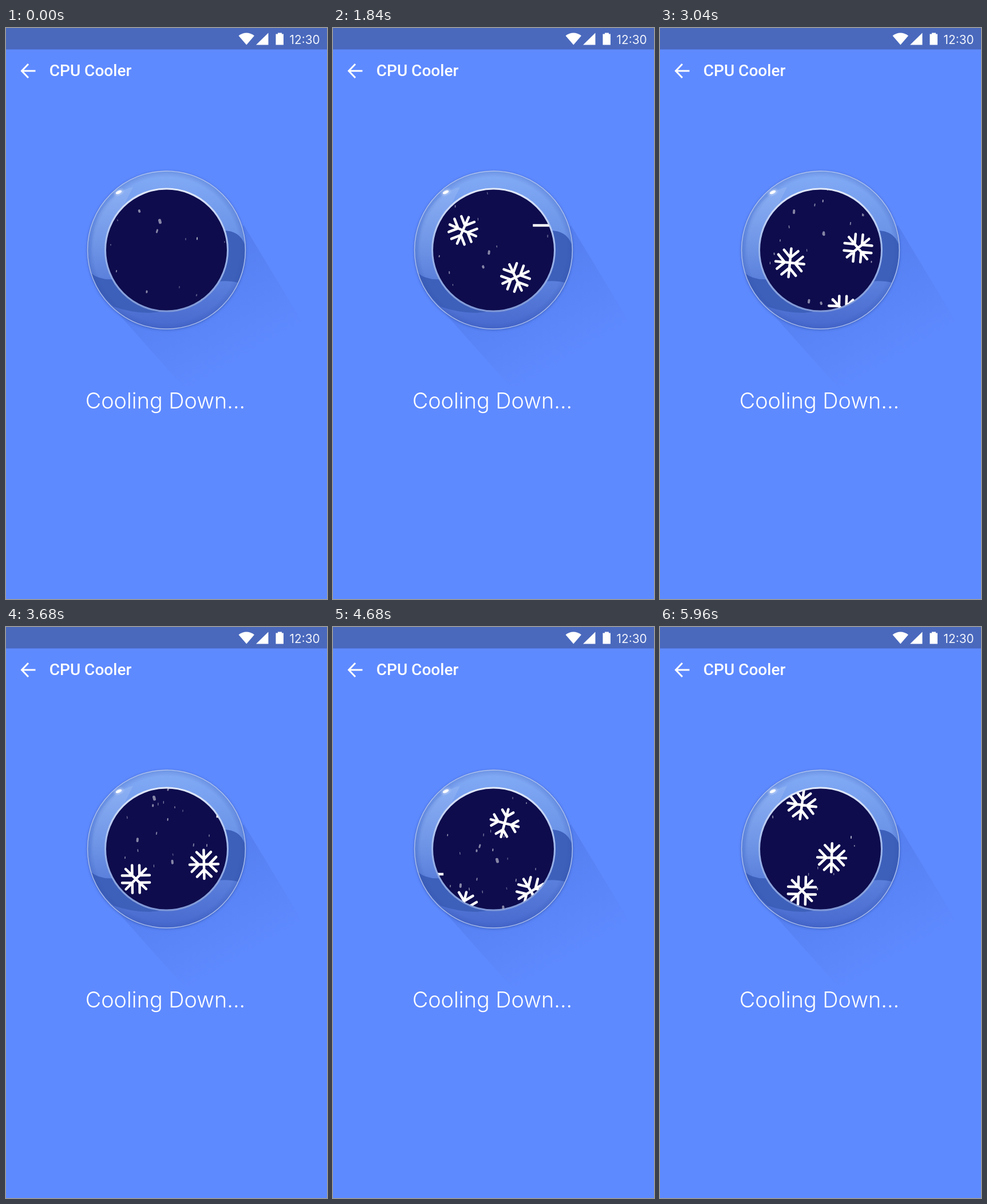
These frames come from a looping animation (561x998 px, 6000 ms). An HTML page with a canvas:

```html
<!DOCTYPE html>
<html lang="en">
<head>
<meta charset="utf-8">
<title>CPU Cooler</title>
<style>
  html, body { margin: 0; width: 100%; height: 100%; overflow: hidden; background: #5e8aff; }
  svg, canvas { position: absolute; left: 0; top: 0; }
</style>
</head>
<body>
<svg width="561" height="998" viewBox="0 0 561 998">
  <defs>
    <linearGradient id="body" x1="0" y1="0" x2="0" y2="1">
      <stop offset="0" stop-color="#82abf6"/>
      <stop offset=".5" stop-color="#668ee4"/>
      <stop offset="1" stop-color="#4869cf"/>
    </linearGradient>
    <linearGradient id="rim" x1="0" y1="0" x2="0" y2="1">
      <stop offset="0" stop-color="#e2eafb"/>
      <stop offset=".5" stop-color="#9db7ec"/>
      <stop offset="1" stop-color="#7f98d6"/>
    </linearGradient>
    <linearGradient id="cast" gradientUnits="userSpaceOnUse" x1="300" y1="423" x2="397" y2="589">
      <stop offset="0" stop-color="#2d4fae" stop-opacity=".18"/>
      <stop offset="1" stop-color="#2d4fae" stop-opacity="0"/>
    </linearGradient>
    <linearGradient id="sheen" x1="0" y1="0" x2="0" y2="1">
      <stop offset="0" stop-color="#fff" stop-opacity=".12"/>
      <stop offset="1" stop-color="#fff" stop-opacity="0"/>
    </linearGradient>
    <radialGradient id="edge">
      <stop offset=".92" stop-color="#2c4ca8" stop-opacity="0"/>
      <stop offset="1" stop-color="#2c4ca8" stop-opacity=".25"/>
    </radialGradient>
    <filter id="soft" x="-20%" y="-20%" width="140%" height="140%"><feGaussianBlur stdDeviation="2"/></filter>
  </defs>

  <path fill="#5e8aff" d="M0 0H561V998H0Z"/>
  <path fill="#4a69bd" d="M0 0H561V37.5H0Z"/>
  <g fill="#fff">
    <path d="M406.5 13.5Q420.2 3.5 434 13.5L420.3 29.5Z"/>
    <path d="M458.5 8.5V29.5H437Z"/>
    <path d="M475 8.5H482V10.5H485V29.5H471.5V10.5H475Z"/>
    <text x="495.5" y="28" font-family="Inter, Roboto, sans-serif" font-weight="400" font-size="20.8" fill="#f1f4fc">12:30</text>
    <text x="75.7" y="84" font-family="Roboto, sans-serif" font-weight="500" font-size="28">CPU Cooler</text>
    <text x="138.7" y="665" font-family="Inter, Roboto, sans-serif" font-weight="350" font-size="37.8">Cooling Down...</text>
  </g>
  <path d="M51.5 75H28M39 63L27.5 75L39 87" fill="none" stroke="#fff" stroke-width="3"/>

  <path d="M416 345L520 518L317 635L195 498Z" fill="url(#cast)"/>
  <circle cx="280.5" cy="389" r="139" fill="#2b4795" opacity=".5" filter="url(#soft)"/>
  <circle cx="280.5" cy="388" r="138" fill="url(#body)"/>
  <path fill="url(#sheen)" d="M222 278Q187 285 163 325Q146 360 149 428Q163 441 188 439L174 388Q176 350 205 312Z"/>
  <g fill="#3d60bb">
    <path d="M148 428Q163 441 188 439L268 496Q232 502 188 487A137 137 0 0 1 148 428Z"/>
    <path d="M380 354Q408 354 417 378A137 137 0 0 1 405 445Q390 441 370 443Z"/>
  </g>
  <circle cx="280.5" cy="388" r="138" fill="url(#edge)"/>
  <circle cx="280.5" cy="388" r="138" fill="none" stroke="#c3d2f3" stroke-opacity=".8" stroke-width="1.4"/>
  <g transform="rotate(-25 197 287)" fill="#fff">
    <ellipse cx="197" cy="287" rx="8" ry="4" opacity=".5" filter="url(#soft)"/>
    <ellipse cx="197" cy="287" rx="5.5" ry="2.6"/>
  </g>
  <circle cx="280.5" cy="388" r="107" fill="#0e0c4d" stroke="url(#rim)" stroke-width="3"/>
</svg>
<canvas id="view" width="561" height="998"></canvas>

<script>
const LOOP = 6000, STEP = 40, FALL = 0.0472, SPIN = 0.06 * Math.PI / 180, SWEEP = 0.165, ARM = 27;
const SKY = 60, SPAN = 440;
const ctx = document.getElementById('view').getContext('2d');
const clamp = v => Math.max(0, Math.min(1, v));

let seed = 11;
const rand = () => (seed = seed * 16807 % 2147483647) / 2147483647;

// x, y, moment the fall begins, side the streak enters from, spin rate
const flakes = [
  [319, 385, 760, 1, 1],
  [227, 335, 1444, -1, 1],
  [346, 345, 2200, 1, 1],
  [300, 331, 4430, 1, 1],
  [248, 234, 4330, -1, 1],
  [248, 432, 5353, -1, -1.2]
];

// x, y, width, length, horizontal and vertical speed in px/ms
const specks = [
  [233, 320, 4, 6, .016, .053], [269, 338, 5, 9, .028, .109], [264, 355, 3, 7, -.027, .1],
  [195, 336, 1, 3], [183, 379, 1.5, 3], [193, 425, 1.5, 4], [246, 461, 3, 5], [303, 453, 1, 4],
  [333, 467, 2, 4], [342, 475, 1.5, 3], [334, 368, 2, 5], [314, 369, 1.5, 4], [382, 374, 1.5, 3]
];
for (let i = 0; i < 28; i++) {
  const big = i % 9 === 4;
  specks.push([172 + 217 * rand(), SKY + 218 * rand(), big ? 4 : 1 + rand(), big ? 8 : 3 + 2.5 * rand()]);
}
for (const s of specks) {
  if (s.length < 6) s.push((rand() - .5) * .024, .045 + .045 * rand());
  s.push(s[2] > 2.5 ? .5 : .3 + .35 * rand());
}

function line(x1, y1, x2, y2) {
  ctx.moveTo(x1, y1);
  ctx.lineTo(x2, y2);
}

function drawSpeck([x, y, w, len, vx, vy, alpha], t) {
  const drop = y + vy * t - SKY;
  const age = t - Math.floor(drop / SPAN) * SPAN / vy;
  ctx.save();
  ctx.translate(x + vx * age, SKY + drop % SPAN);
  ctx.rotate(-Math.atan2(vx, vy));
  ctx.globalAlpha = alpha;
  ctx.lineWidth = w;
  ctx.beginPath();
  line(0, -(len - w) / 2, 0, (len - w) / 2);
  ctx.stroke();
  ctx.restore();
}

function drawFlake([x, y, start, side, turn], t) {
  const age = t - start;
  ctx.save();
  ctx.translate(x, y + FALL * Math.max(0, age));
  ctx.lineWidth = 4.5;
  ctx.beginPath();
  if (age < -100) {
    // A streak flies in from the side and opens into a cross.
    ctx.lineCap = 'butt';
    const head = Math.min(ARM, SWEEP * (age + 340));
    const tail = -ARM + SWEEP * (age + 100);
    line(side * -tail, 0, side * -head, 0);
    if (head > 0) line(0, -head, 0, head);
  } else {
    // Side branches slide inwards and lengthen.
    const grow = clamp((age + 100) / 500);
    const base = 18 - 9 * grow, reach = 4 + 8.5 * grow;
    ctx.rotate(turn * SPIN * Math.max(0, age));
    for (let i = 0; i < 4; i++) {
      line(0, 0, ARM - 2, 0);
      line(base, 0, base + reach, reach);
      line(base, 0, base + reach, -reach);
      ctx.rotate(Math.PI / 2);
    }
  }
  ctx.stroke();
  ctx.restore();
}

function draw(now) {
  const t = Math.floor(now % LOOP / STEP) * STEP;
  ctx.clearRect(0, 0, 561, 998);
  ctx.save();
  ctx.beginPath();
  ctx.arc(280.5, 388, 106, 0, 7);
  ctx.clip();
  ctx.strokeStyle = '#fff';
  ctx.lineCap = 'round';
  for (const s of specks) drawSpeck(s, t);
  for (const f of flakes) drawFlake(f, t);
  ctx.restore();
}

const begin = performance.now();
function tick() {
  draw(performance.now() - begin);
  requestAnimationFrame(tick);
}
tick();
</script>
</body>
</html>
```
